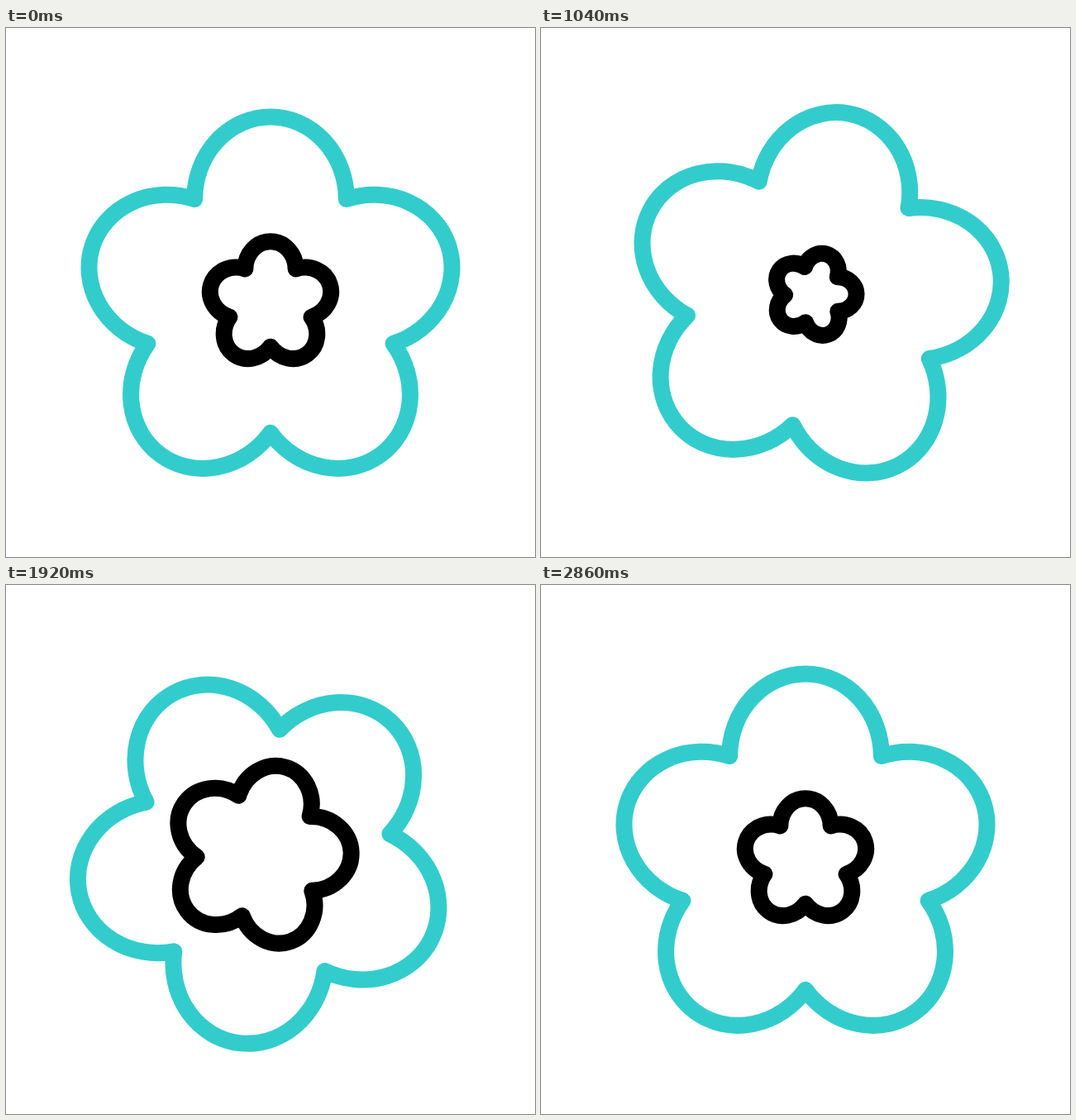
Recreate the animation shown at these times as an HTML page. Size 640x640 px, loop 3000 ms.

```html
<!DOCTYPE html>
<html lang="en">
<head>
<meta charset="utf-8">
<title>Flower</title>
<style>
  html, body { margin: 0; height: 100%; overflow: hidden; background: #fff; }
  svg { display: block; width: 100vw; height: 100vh; }
</style>
</head>
<body>
<svg viewBox="0 0 640 640" fill="none" stroke-linejoin="round">
  <path id="petals" stroke="#33cccc" stroke-width="20"/>
  <path id="heart" stroke="#000"/>
</svg>
<script>
const LOOP = 3000, LINE = 20;
const RADIUS = 156.3;   // centre to the notches between petals
const LENGTH = 100;     // petal length beyond the notches
const DROP = 13.5;      // flower centre below its pivot

// Keys are [time in ms, value]
const SPIN = [[0, 0], [933, -65], [955, -65], [1810, 45], [2800, 0]];
const HEART_SPIN = [[0, 0], [1000, -65], [1032, -65], [1887, 45], [2867, 0]];
const HEART_SIZE = [[0, 1], [967, 0.655], [1730, 1.51], [2805, 1]];
HEART_SPIN[0][0] = 67;

const petals = document.getElementById('petals');
const heart = document.getElementById('heart');

function flowerPath() {
  const notch = deg => {
    const a = deg * Math.PI / 180;
    return (RADIUS * Math.cos(a)).toFixed(2) + ' ' + (RADIUS * Math.sin(a)).toFixed(2);
  };
  const halfWidth = RADIUS * Math.sin(Math.PI / 5);
  let d = 'M' + notch(90);
  for (let deg = 90; deg < 450; deg += 72) {
    d += `A${LENGTH} ${halfWidth} ${deg + 36} 0 1 ${notch(deg + 72)}`;
  }
  return d + 'Z';
}

function valueAt(keys, t) {
  if (t <= keys[0][0]) return keys[0][1];
  for (let i = 1; i < keys.length; i++) {
    const [t0, v0] = keys[i - 1], [t1, v1] = keys[i];
    if (t < t1) {
      const x = (t - t0) / (t1 - t0);
      return v0 + (v1 - v0) * x * x * (3 - 2 * x);
    }
  }
  return keys[keys.length - 1][1];
}

function draw(t) {
  const turn = `translate(320 320) rotate(${valueAt(SPIN, t)}) `;
  const size = valueAt(HEART_SIZE, t) / 3;
  petals.setAttribute('transform', turn + `translate(0 ${DROP})`);
  heart.setAttribute('transform', turn +
    `translate(0 9.1) rotate(${valueAt(HEART_SPIN, t)}) scale(${size}) translate(0 ${DROP})`);
  heart.setAttribute('stroke-width', LINE / size);
}

const shape = flowerPath();
petals.setAttribute('d', shape);
heart.setAttribute('d', shape);

const start = performance.now();
function tick() {
  draw((performance.now() - start) % LOOP);
  requestAnimationFrame(tick);
}
tick();
</script>
</body>
</html>
```
